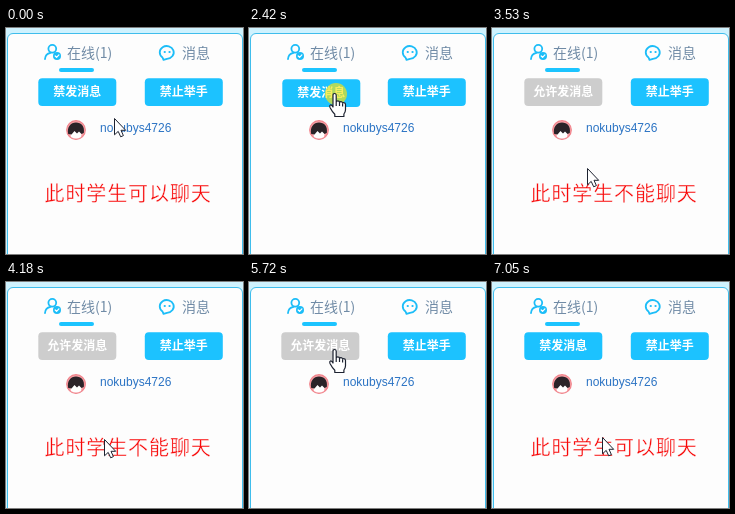
Animation, 237 px wide and 226 px high, one loop 8.38 s. Source, as an HTML page:

```html
<!DOCTYPE html>
<html lang="zh">
<head>
<meta charset="utf-8">
<style>
  html, body { margin: 0; width: 100%; height: 100%; overflow: hidden; background: #cff2fe; }
  svg { display: block; width: 237px; height: 226px; }
  text { font-family: "Noto Sans CJK SC", "Noto Sans CJK", sans-serif; }
  .tab { font-size: 14px; fill: #708ba6; }
  .label { font-size: 12px; font-weight: 700; fill: #fff; text-anchor: middle; }
  .user { font: 12px "Liberation Sans", Arial, sans-serif; fill: #2c74c4; }
  .note { font-size: 20px; letter-spacing: .9px; fill: #f80808; stroke: #fdfdfd; stroke-width: .35; }
  .icon { fill: none; stroke: #1cbdf8; stroke-width: 1.8; stroke-linecap: round; stroke-linejoin: round; }
</style>
</head>
<body>
<svg viewBox="0 0 237 226">
  <rect x="1.5" y="5.5" width="235" height="240" rx="5.5" fill="#fdfdfd" stroke="#3fbdec"/>

  <g class="icon">
    <circle cx="46.3" cy="20.8" r="3.9"/>
    <path d="M39 31c.2-3.4 2.3-5.6 5.5-6.2"/>
    <circle cx="51" cy="28" r="4" fill="#1cbdf8" stroke="none"/>
    <path d="M49.2 28l1.400 1.400 2.300-2.500" stroke="#fff" stroke-width="1.2"/>
    <path d="M156.500 29.500a7 6.400 0 1 1 4.500 1.300l-3.500 1z"/>
    <path d="M158.700 24h.1M163.500 24h.1" stroke-width="2.200"/>
  </g>
  <text class="tab" x="61" y="29.500">在线(1)</text>
  <text class="tab" x="176" y="30">消息</text>
  <rect x="53" y="40" width="35" height="4" rx="2" fill="#1cc4ff"/>

  <g id="mute">
    <rect id="muteBox" x="32.300" y="50.200" width="78" height="27.800" rx="4"/>
    <text id="muteLabel" class="label" x="71.300" y="67.500"></text>
  </g>
  <rect x="138.800" y="50.200" width="78" height="27.800" rx="4" fill="#1cc2ff"/>
  <text class="label" x="177.700" y="67.500">禁止举手</text>

  <circle cx="70" cy="102" r="9.300" fill="#f7a3a8" stroke="#f0838b" stroke-width="1.200"/>
  <path d="M64 103h12l-1 6q-5 3-10 0z" fill="#fff"/>
  <path d="M62.200 106c-1.500-7 2.500-11.500 7.800-11.500s9 4 7.800 10.500l-2.300 1-2.500-2.500-2 2-2.500-2.500-3 3.500z" fill="#2b2328"/>
  <text class="user" x="94" y="104">nokubys4726</text>

  <text id="note" class="note" x="38.500" y="172.800"></text>

  <circle id="press" cx="87" cy="66" r="11" fill="#f5e512" opacity=".68"/>
  <g id="cursor" fill="#fff" stroke="#1d2230" stroke-linejoin="round">
    <path id="arrow" d="M.5.5v16.300l3.700-3.400 2.500 5.400 2.700-1.200-2.400-5.300h4.700z"/>
    <path id="hand" stroke-width="1.200" d="M-2 14V2.200q0-1.700 1.600-1.700t1.600 1.700V9q.4-1.300 1.700-1.200 1.500 0 1.600 1.700.5-1 1.600-.9 1.400.1 1.500 1.700.4-.8 1.400-.7 1.500.1 1.500 2v5.200q0 2.200-1.600 4.200V23.500H-.2V21.200Q-3 18.500-5 14.500-5.800 12.800-4.600 12q1.200-.6 2.600 2zM1.200 9v4M4.500 10v3M7.600 11v2.500"/>
  </g>
</svg>
<script>
const LOOP = 8380, STEP = 112;
const el = id => document.getElementById(id);

// Each move eases the cursor to a point in a number of equal steps
const home = [110, 155];
const moves = [
  { start: 0, steps: 1, to: [108, 90] },
  { start: 1190, steps: 5, to: [86, 65] },
  { start: 3180, steps: 7, to: [97, 157] },
  { start: 4180, steps: 1, to: [98, 157] },
  { start: 5160, steps: 6, to: [86, 67] },
  { start: 6490, steps: 6, to: home }
];

const within = (t, from, to) => t >= from && t < to;
const easeOut = p => 1 - (1 - p) ** 2;

function cursorAt(t) {
  let pos = home;
  for (const { start, steps, to } of moves) {
    if (t < start) break;
    const step = Math.min(steps, Math.floor((t - start) / STEP + .05) + 1);
    const k = easeOut(step / steps);
    pos = pos.map((v, i) => Math.round(v + (to[i] - v) * k));
  }
  return pos;
}

function noteAt(t) {
  if (within(t, 3070, 5160)) return '此时学生不能聊天';
  return within(t, 1190, 6490) ? '' : '此时学生可以聊天';
}

const show = (id, on) => el(id).setAttribute('visibility', on ? 'visible' : 'hidden');

function draw(t) {
  const [x, y] = cursorAt(t);
  const muted = within(t, 2520, 6150);
  const down = within(t, 2420, 2520) || within(t, 6040, 6260);
  const overButton = y < 78;
  el('cursor').setAttribute('transform', `translate(${x} ${y})`);
  show('hand', overButton);
  show('arrow', !overButton);
  show('press', down);
  el('mute').setAttribute('transform', down ? 'translate(1 1)' : '');
  el('muteBox').setAttribute('fill', muted ? '#cdcdcd' : '#1cc2ff');
  el('muteLabel').textContent = muted ? '允许发消息' : '禁发消息';
  el('note').textContent = noteAt(t);
}

const start = performance.now();
function tick() {
  draw((performance.now() - start) % LOOP);
  requestAnimationFrame(tick);
}
tick();
</script>
</body>
</html>
```
